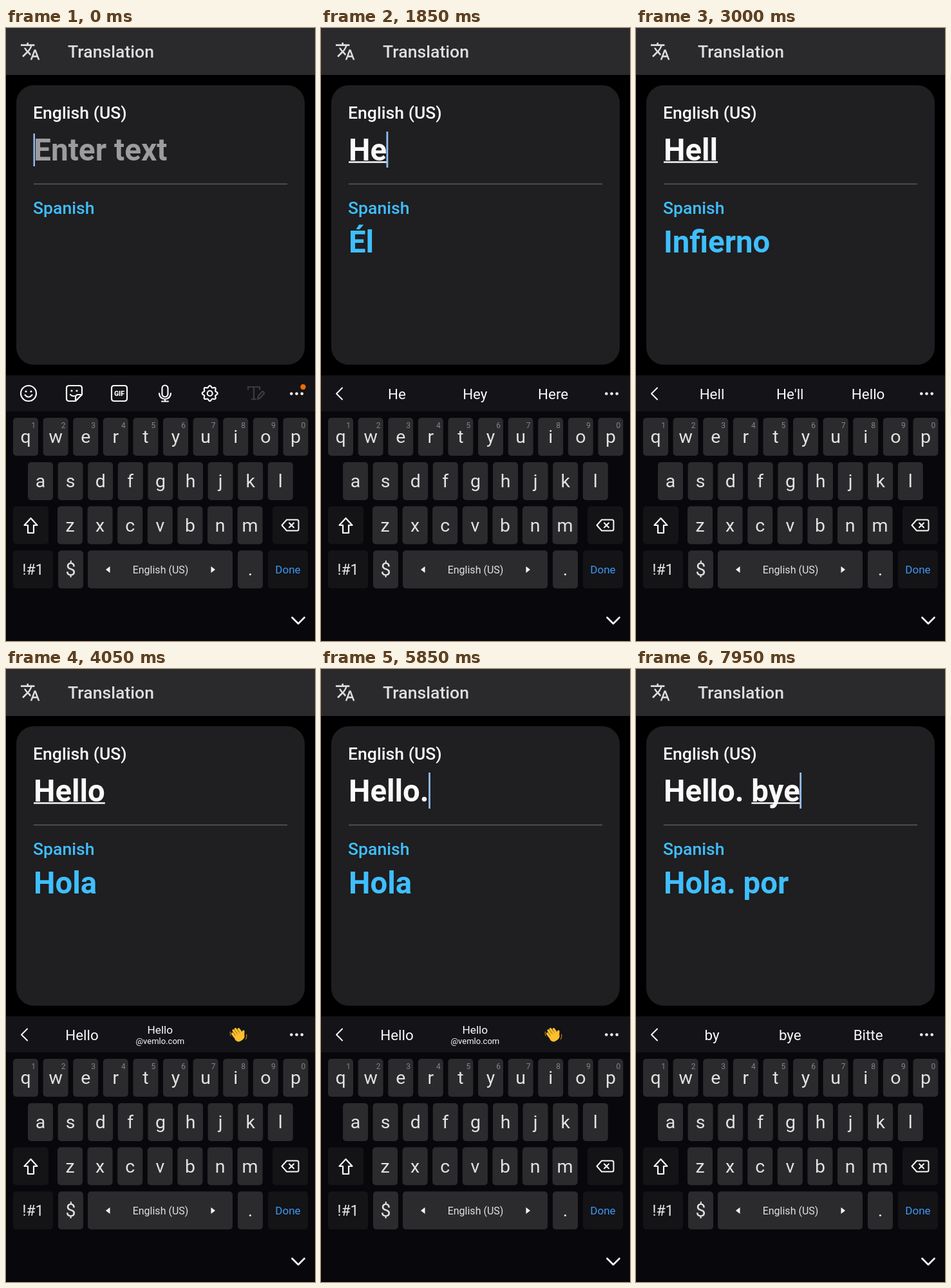
These frames come from a looping animation (480 px wide and 953 px high, 8000 ms). An HTML page with a canvas:

```html
<!DOCTYPE html>
<html lang="en">
<head>
<meta charset="utf-8">
<title>Translation keyboard</title>
<style>
  html, body { margin: 0; height: 100%; overflow: hidden; background: #000; }
  canvas { display: block; width: 100vw; height: 100vh; }
</style>
</head>
<body>
<canvas id="stage" width="480" height="953"></canvas>
<script>
const ctx = document.getElementById('stage').getContext('2d');
const LOOP = 8000, BLINK = 500, FADE = 160, LEFT = 43;
const WHITE = '#fafafa', BLUE = '#3fbfff';
const TRANSLATE_ICON = new Path2D('M12.87 15.07l-2.54-2.51.03-.03c1.74-1.94 2.98-4.17 3.71-6.53H17V4h-7V2H8v2H1v1.99h11.17C11.5 7.92 10.44 9.75 9 11.35 8.07 10.32 7.3 9.19 6.69 8h-2c.73 1.63 1.73 3.17 2.98 4.56l-5.09 5.02L4 19l5-5 3.11 3.11zM18.5 10h-2L12 22h2l1.12-3h4.75L21 22h2zm-2.62 7l1.62-4.33L19.12 17z');

// Each timeline lists [start ms, value]
const INPUT = [[-50, ''], [950, 'H'], [1450, 'He'], [1950, 'Hel'], [2500, 'Hell'], [3300, 'Hello'],
  [5800, 'Hello.'], [6150, 'Hello. '], [6400, 'Hello. b'], [6950, 'Hello. by'], [7800, 'Hello. bye']];
const OUTPUT = [[0, ''], [1200, 'H'], [1750, 'Él'], [2250, 'Hel'], [2800, 'Infierno'], [3700, 'Hola'],
  [6300, 'Hola.'], [6700, 'Hola. B'], [7350, 'Hola. por']];
const SUGGESTIONS = [[-FADE, null], [1000, ['H', 'Hi', 'He']], [1550, ['He', 'Hey', 'Here']],
  [2200, ['Hel', 'Help', 'Hello']], [2650, ['Hell', "He'll", 'Hello']],
  [3600, ['Hello', 'Hello\n@vemlo.com', 'wave']], [6200, ['I', 'in', "I'm"]],
  [6700, ['b', 'Bit\u00a0\u00a0', 'Be']], [7200, ['by', 'bye', 'Bitte']]];
const PRESSES = [['shift', 450, 550], ['h', 850, 1000], ['e', 1350, 1500], ['l', 1900, 2000],
  ['l', 2400, 2550], ['o', 3200, 3350], ['.', 5750, 5850], ['space', 6050, 6200],
  ['b', 6300, 6450], ['y', 6850, 7000], ['e', 7700, 7850]];
const CAPS = [500, 950];

const keys = [];
const addKey = (id, x, y, w = 39, dark = false) => keys.push({ id, x, y, w, dark });
const addRow = (letters, x, y) => [...letters].forEach((c, i) => addKey(c, x + i * 46.6, y));
addRow('qwertyuiop', 11, 606);
addRow('asdfghjkl', 34, 675);
addRow('zxcvbnm', 80, 743.5);
addKey('shift', 11, 743.5, 55, true);
addKey('back', 414, 743.5, 55, true);
addKey('!#1', 11, 812.3, 62, true);
addKey('$', 81, 812.3);
addKey('space', 127, 812.3, 225);
addKey('.', 360, 812.3);
addKey('Done', 407, 812.3, 62, true);

const indexAt = (list, t) => list.findLastIndex(([start]) => t >= start);

function box(x, y, w, h, r, color) {
  ctx.fillStyle = color;
  ctx.beginPath();
  ctx.roundRect(x, y, w, h, r);
  ctx.fill();
}
function text(str, x, y, size, color, weight = 400, align = 'left') {
  ctx.font = `${weight} ${size}px Roboto, sans-serif`;
  ctx.textAlign = align;
  ctx.fillStyle = color;
  ctx.fillText(str, x, y);
  return ctx.measureText(str).width;
}
const centered = (str, x, y, size, color, weight) => text(str, x, y, size, color, weight, 'center');
function stroke(path, color = WHITE, width = 2.2) {
  ctx.strokeStyle = color;
  ctx.lineWidth = width;
  ctx.lineCap = ctx.lineJoin = 'round';
  ctx.stroke(new Path2D(path));
}
function dot(x, y, r, color = WHITE) {
  ctx.fillStyle = color;
  ctx.beginPath();
  ctx.arc(x, y, r, 0, 7);
  ctx.fill();
}
function at(x, y, draw, scale = 1) {
  ctx.save();
  ctx.translate(x, y);
  ctx.scale(scale, scale);
  draw();
  ctx.restore();
}
function faded(alpha, draw) {
  if (alpha <= 0) return;
  ctx.save();
  ctx.globalAlpha = alpha;
  draw();
  ctx.restore();
}

function smile() {
  dot(-4, -3, 1.6);
  dot(4, -3, 1.6);
  stroke('M-5.5 2.5Q0 9 5.5 2.5');
}
function gear() {
  let path = '';
  for (let i = 0; i < 64; i++) {
    const a = i / 64 * 2 * Math.PI, r = 10.6 + 1.4 * Math.cos(8 * a);
    path += `${i ? 'L' : 'M'}${r * Math.sin(a)} ${r * Math.cos(a)}`;
  }
  stroke(path + 'Z');
  stroke('M4 0A4 4 0 1 1-4 0A4 4 0 1 1 4 0');
}
function wave() {
  ctx.rotate(-0.62);
  const skin = '#fcc02e';
  stroke('M-6-1L-6-7M-2-2L-2-10M2-2L2-10M6 0L6-7M6 5L10 0', skin, 3.6);
  box(-8, -3, 16, 13, 6, skin);
  stroke('M-4-1V-4M0-1V-5M4-1V-4', '#c98516', 0.8);
  stroke('M-10-6Q-9-10-7-11M11 7Q9 11 6 12', '#c98516', 1.2);
}

function drawTools() {
  at(35, 568, () => { stroke('M12 0A12 12 0 1 1-12 0A12 12 0 1 1 12 0'); smile(); });
  at(106, 568, () => {
    stroke('M-8-12H8Q12-12 12-8V2L2 12H-8Q-12 12-12 8V-8Q-12-12-8-12M12 2H6Q2 2 2 6V12');
    dot(-4, -4, 1.6);
    dot(4, -4, 1.6);
    stroke('M-6 2Q-3 5 0 4');
  });
  at(176, 568, () => {
    stroke('M-8-12H8Q12-12 12-8V8Q12 12 8 12H-8Q-12 12-12 8V-8Q-12-12-8-12');
    centered('GIF', 0, 4, 10.5, WHITE, 800);
  });
  at(247, 568, () => stroke('M-4.5-8A4.5 4.5 0 0 1 4.5-8V1A4.5 4.5 0 0 1-4.5 1ZM-9 0A9 9 0 0 0 9 0M0 9V12.5M-5 12.5H5'));
  at(316.7, 568, gear);
  at(388, 568, () => stroke('M-12-6V-10H6V-6M-3-10V9M-6 9H0M3 9L4 4L10-3Q13-3 13 0L7 7Z', '#3c3b3f'));
  dot(461.5, 558, 4.2, '#f56a00');
}

function drawSuggestions(words) {
  stroke('M33 559.5L24 568.5L33 577.5', WHITE, 2);
  words.forEach((word, i) => {
    const x = 118 + i * 121.3, [main, domain] = word.split('\n');
    if (word === 'wave') at(x, 569, wave);
    else if (domain) {
      centered(main, x, 566.5, 17.3, WHITE);
      centered(domain, x, 583, 13, WHITE);
    } else centered(main, x, 576.5, 22.4, WHITE);
  });
}

function drawBar(t) {
  box(0, 540, 480, 56, 0, '#141317');
  const i = indexAt(SUGGESTIONS, t), [start, words] = SUGGESTIONS[i];
  const mix = Math.min(1, (t - start) / FADE);
  const show = content => content ? drawSuggestions(content) : drawTools();
  if (i > 0) faded(1 - mix, () => show(SUGGESTIONS[i - 1][1]));
  faded(mix, () => show(words));
  for (const x of [443.3, 451.5, 459.7]) dot(x, 568.5, 2.3);
}

function drawKey({ id, x, y, w, dark }, caps, pressed) {
  const mid = x + w / 2;
  box(x, y, w, 59, 5, pressed ? '#48474c' : dark ? '#141316' : '#2b2a2d');
  if (id === 'shift') {
    const arrow = 'M38.5 762L48.5 773H43V785H34V773H28.5Z';
    if (caps) { ctx.fillStyle = WHITE; ctx.fill(new Path2D(arrow)); }
    stroke(arrow);
  } else if (id === 'back') {
    stroke('M436 764.5H452Q454.5 764.5 454.5 767V779Q454.5 781.5 452 781.5H436L428.5 773ZM440 769.5L447 776.5M447 769.5L440 776.5', WHITE, 2);
  } else if (id === 'space') {
    centered('English (US)', 240, 848, 16, '#e2e2e2');
    ctx.fillStyle = WHITE;
    ctx.fill(new Path2D('M161.5 837V847L155 842ZM318.5 837V847L325 842Z'));
  } else if (id === 'Done') centered(id, mid, 848, 17, '#3b98f2');
  else if (id === '!#1') centered(id, mid, 850, 23, '#e8e8e8');
  else {
    centered(caps ? id.toUpperCase() : id, mid, y + 39, 28.5, '#e2e2e2');
    const digit = 'qwertyuiop'.indexOf(id);
    if (digit >= 0) centered((digit + 1) % 10, x + 31.5, y + 16, 12, '#858488');
  }
}

function drawKeyboard(t) {
  box(0, 596, 480, 357, 0, '#08070b');
  const caps = t >= CAPS[0] && t < CAPS[1];
  const press = PRESSES.find(([, from, to]) => t >= from && t < to);
  const active = press && keys.find(key => key.id === press[0]);
  for (const key of keys) drawKey(key, caps, key === active);
  stroke('M444.5 916.5L454 926L463.5 916.5', WHITE, 2.8);
  if (active && active.id.length === 1) {
    const mid = active.x + active.w / 2;
    box(mid - 36.5, active.y - 70, 73, 70, 9, '#48474c');
    centered(caps ? active.id.toUpperCase() : active.id, mid, active.y - 22, 40, WHITE);
  }
}

function drawCard(t) {
  box(16, 89, 448, 434.5, 27, '#1f1e20');
  text('English (US)', LEFT - 1, 141, 26.6, WHITE, 500);
  const [typedAt, typed] = INPUT[indexAt(INPUT, t)];
  let width = 0;
  if (typed) {
    width = text(typed, LEFT, 205.5, 47.3, WHITE, 700);
    const word = typed.split(' ').pop();
    if (!word.endsWith('.')) {
      const wordWidth = ctx.measureText(word).width;
      box(LEFT + width - wordWidth, 207.3, wordWidth, 2.4, 0, WHITE);
    }
  } else text('Enter text', LEFT, 205.5, 47.8, '#9c9b9d', 700);
  if (Math.floor((t - typedAt) / BLINK) % 2 === 0) {
    if (typed) box(LEFT + width - 0.5, 161, 2.8, 56, 0, '#93bdf5');
    else box(42.5, 164, 2.5, 51, 0, '#93bdf5');
  }
  box(LEFT, 241.7, 394, 1.5, 0, '#5b5a5c');
  text('Spanish', LEFT - 1, 289, 26.6, BLUE, 500);
  text(OUTPUT[indexAt(OUTPUT, t)][1], LEFT, 349, 47.3, BLUE, 700);
}

function frame(now) {
  const t = now % LOOP;
  box(0, 0, 480, 953, 0, '#000');
  box(0, 0, 480, 73, 0, '#2a292b');
  at(21.6, 20, () => { ctx.fillStyle = '#dddddd'; ctx.fill(TRANSLATE_ICON); }, 1.34);
  text('Translation', 96, 46, 26.6, '#dedede', 500);
  drawCard(t);
  drawBar(t);
  drawKeyboard(t);
  requestAnimationFrame(frame);
}
requestAnimationFrame(frame);
</script>
</body>
</html>
```
